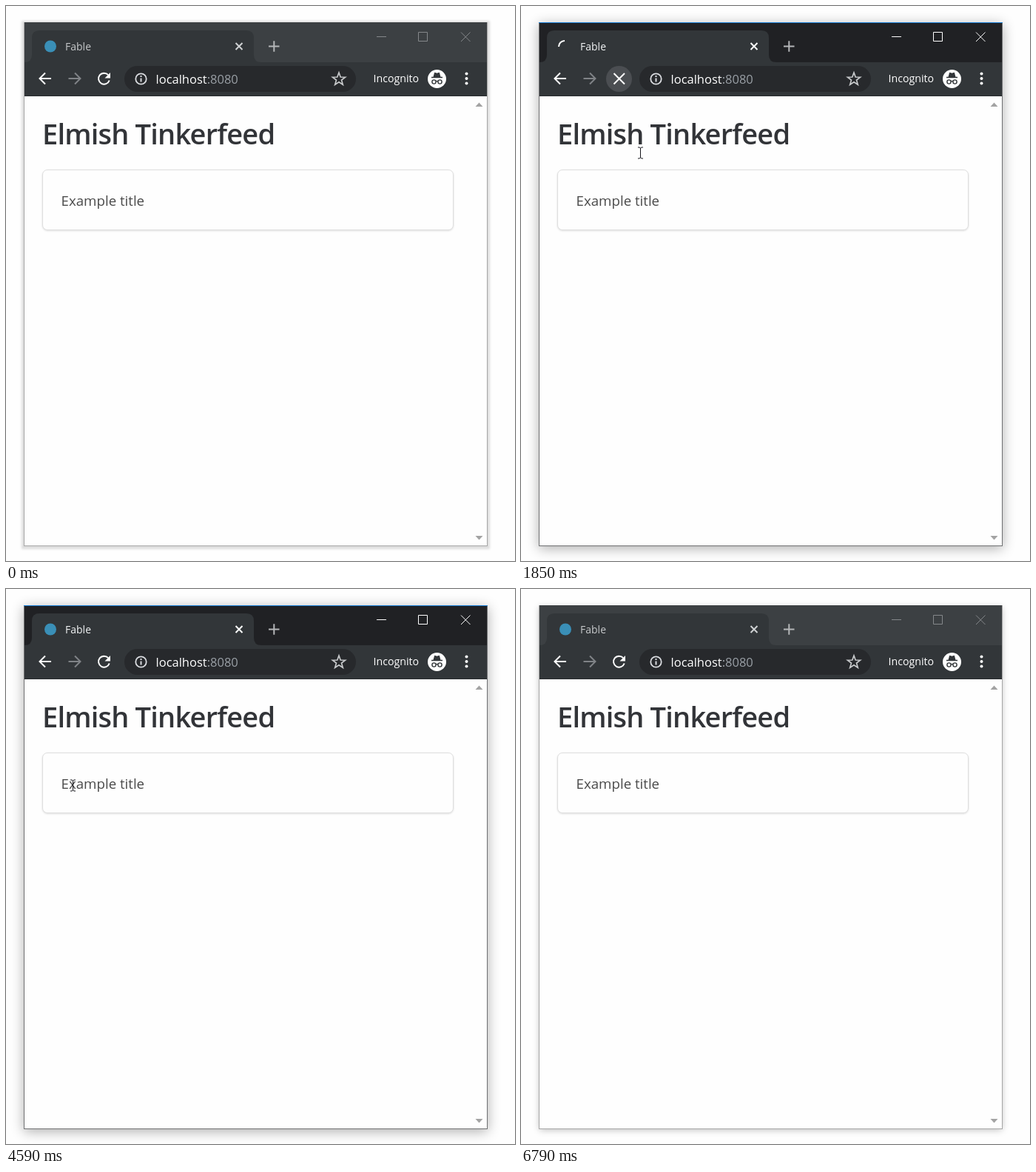
An HTML page for the animation above (6.87 s loop, 688 px wide and 750 px high).

```html
<!DOCTYPE html>
<html lang="en">
<head>
<meta charset="utf-8">
<title>Browser reload</title>
<style>
  html, body { margin: 0; width: 100%; height: 100%; overflow: hidden; background: #fefefe; }
  svg { display: block; }
  text { font-family: "Open Sans", "Noto Sans", sans-serif; }
  .line { fill: none; stroke: #fff; stroke-width: 2; }
  #frame { position: absolute; left: 25px; top: 23px; width: 625px; height: 706px; }
  #stage { position: absolute; left: 0; top: 0; }
  .entry { font-size: 18.7px; }
</style>
</head>
<body>
<div id="frame"></div>
<svg id="stage" width="688" height="750" viewBox="0 0 688 750">
  <defs>
    <clipPath id="selClip"><rect id="selArea" y="247" height="30"/></clipPath>
  </defs>

  <!-- window -->
  <rect id="border" x="24.5" y="22.5" width="626" height="707" fill="#fefefe"/>
  <rect id="bar" x="25" y="22" width="625" height="55"/>
  <rect id="topLine" x="24" y="22" width="627" height="1" fill="#1a7fd8"/>
  <path d="M25 76Q35 76 35 66V43Q35 33 45 33H325Q335 33 335 43V66Q335 76 345 76H650V122H25Z" fill="#323639"/>
  <path d="M25 121.5H650" stroke="#282b2e"/>

  <!-- tab -->
  <circle id="favicon" cx="60" cy="54.5" r="8" fill="#3a8fb7"/>
  <path id="spinner" class="line" d="M51 55A8 8 0 0 1 59 47" stroke-width="2.4"/>
  <text id="tabName" x="80" y="60" font-size="14">Fable</text>
  <path id="tabClose" class="line" d="M310.5 50L319.500 59M319.500 50L310.500 59"/>
  <path class="line" d="M355 54.500H369.500M362.300 47.200V61.700" style="stroke:#b4b6b8"/>

  <!-- window buttons -->
  <path id="controls" fill="none" d="M501 41.500H514M557.500 35.500H569.500V47.500H557.500ZM615 35.500L627.500 48M627.500 35.500L615 48"/>

  <!-- toolbar -->
  <path class="line" d="M61 98H46M53 90.500L45.500 98L53 105.500"/>
  <path class="line" d="M84.500 98H99.500M93 90.500L100.500 98L93 105.500" style="stroke:#808387"/>
  <circle id="hover" cx="132.500" cy="98.500" r="17.500" fill="#4b4e52"/>
  <g id="reload">
    <path class="line" d="M138.200 93.200A7.500 7.500 0 1 0 139.700 100.500"/>
    <path d="M141 90V97.500H133.500Z" fill="#fff"/>
  </g>
  <path id="stop" class="line" d="M125.500 91L140 105.500M140 91L125.500 105.500"/>
  <rect x="160" y="81" width="313" height="35" rx="17.500" fill="#27292c"/>
  <circle class="line" cx="182.500" cy="98.500" r="7.200" style="stroke:#dadce0;stroke-width:1.8"/>
  <path d="M182.500 97.500V102.500M182.500 94V96" stroke="#dadce0" stroke-width="2"/>
  <text x="202.500" y="104.500" font-size="16.500" fill="#fff">localhost<tspan fill="#9aa0a6">:8080</tspan></text>
  <path id="star" fill="none" stroke="#c8cacc" stroke-width="1.700"/>
  <text x="496.500" y="103" font-size="14.200" fill="#fff">Incognito</text>
  <circle cx="582.500" cy="98.500" r="12.500" fill="#fff"/>
  <path d="M575 96.500H590M578.500 95L579.700 90.700L582.500 91.500L585.300 90.700L586.500 95Z" stroke="#323639" stroke-width="1.500" fill="#323639"/>
  <path d="M581 102Q582.500 101 584 102" fill="none" stroke="#323639" stroke-width="1.300"/>
  <g fill="none" stroke="#323639" stroke-width="1.400">
    <circle cx="578.500" cy="102.500" r="2.600"/><circle cx="586.500" cy="102.500" r="2.600"/>
  </g>
  <g fill="#fff">
    <circle cx="622.500" cy="91.500" r="2"/><circle cx="622.500" cy="98" r="2"/><circle cx="622.500" cy="104.500" r="2"/>
  </g>

  <!-- page -->
  <path d="M634.500 136H644.500L639.500 130.500ZM634.500 716H644.500L639.500 721.500Z" fill="#a3a3a3"/>
  <text x="49" y="186.500" font-size="38" font-weight="600" letter-spacing="-.8" fill="#323438">Elmish Tinkerfeed</text>
  <g id="card">
    <rect x="49.500" y="221.500" width="555" height="81" rx="6.500" fill="#fefefe" stroke="#dedede"
      style="filter:drop-shadow(0 1.500px 1px rgba(10,10,10,.13))"/>
    <text id="entry" class="entry" x="74.500" y="270" fill="#4a4a4a">Example title</text>
    <g id="selection" clip-path="url(#selClip)">
      <rect x="75" y="247" width="120" height="30" fill="#3297fd"/>
      <text class="entry" x="74.500" y="270" fill="#fff">Example title</text>
    </g>
  </g>
  <path id="gear" fill="#4a4a4a" fill-rule="evenodd"/>
  <g id="status">
    <path d="M25 703H228Q232 703 232 707V729H25Z" fill="#323639"/>
    <text x="31" y="721" font-size="13.500" fill="#dadce0">Waiting for localhost...</text>
  </g>

  <!-- pointers -->
  <path id="arrow" d="M.5 .5V16.500L4.200 13L6.800 18.700L9.300 17.600L6.800 12H11.700Z" fill="#fff" stroke="#16161c"/>
  <path id="beam" fill="none" stroke="#16161c" d="M-3.500 -7.500H-1.500L0 -6.500L1.500 -7.500H3.500M0 -6.500V6.500M-3.500 7.500H-1.500L0 6.500L1.500 7.500H3.500"/>
</svg>
<script>
const LOOP = 6870;
const $ = id => document.getElementById(id);
const show = (id, on) => $(id).style.display = on ? '' : 'none';
const set = (id, name, value) => $(id).setAttribute(name, value);
const polar = (r, deg) => {
  const a = deg * Math.PI / 180;
  return `${(r * Math.cos(a)).toFixed(2)} ${(r * Math.sin(a)).toFixed(2)}`;
};

// pointer path: time, x, y
const track = [
  [70, 583, 726], [250, 510, 600], [500, 320, 375], [750, 204, 232], [980, 162, 156],
  [1200, 142, 116], [1370, 134, 99], [1500, 134, 99], [1660, 144, 130], [1850, 161, 198],
  [2080, 186, 335], [2320, 197, 424], [3880, 197, 424], [4080, 208, 385], [4330, 165, 305],
  [4560, 97, 266], [4640, 85, 268], [4780, 85, 268], [4990, 155, 263], [5190, 225, 253],
  [5630, 225, 253], [5850, 320, 375], [6100, 480, 590], [6320, 584, 706], [6590, 627, 748]
];

function slope(i, k) {
  const a = track[i - 1], b = track[i], c = track[i + 1];
  if (!a || !c || a[k] === b[k] || b[k] === c[k]) return 0;
  return (c[k] - a[k]) / (c[0] - a[0]);
}

function pointerAt(t) {
  let i = track.findIndex(p => p[0] > t) - 1;
  if (i < 0) i = t < track[0][0] ? 0 : track.length - 2;
  const a = track[i], b = track[i + 1], d = b[0] - a[0];
  const u = Math.min(1, Math.max(0, (t - a[0]) / d));
  return [1, 2].map(k =>
    (1 + 2 * u) * (1 - u) ** 2 * a[k] + u * (1 - u) ** 2 * d * slope(i, k) +
    u * u * (3 - 2 * u) * b[k] - u * u * (1 - u) * d * slope(i + 1, k));
}

function buildShapes() {
  const gear = [];
  for (let i = 0; i < 6; i++) {
    const a = i * 60;
    gear.push(polar(14.5, a - 20), polar(19.3, a - 14), polar(20, a),
      polar(19.3, a + 14), polar(14.5, a + 20), polar(14.5, a + 30));
  }
  set('gear', 'd', `M${gear.join('L')}ZM-6.5 0A6.5 6.5 0 1 0 6.500 0A6.500 6.500 0 1 0 -6.500 0Z`);
  const star = Array.from({ length: 10 }, (_, i) => polar(i % 2 ? 3.700 : 9, i * 36 - 90));
  set('star', 'd', `M${star.join('L')}Z`);
  set('star', 'transform', 'translate(450 99)');
}

function select(t, x) {
  const on = t >= 4790 && t < 5390;
  show('selection', on);
  if (!on) return;
  const entry = $('entry');
  const start = entry.getStartPositionOfChar(1).x;
  let end = start;
  for (let i = 1; i < entry.getNumberOfChars(); i++) {
    const left = entry.getStartPositionOfChar(i).x, right = entry.getEndPositionOfChar(i).x;
    if (x > (left + right) / 2) end = right;
  }
  set('selArea', 'x', start);
  set('selArea', 'width', end - start);
}

function draw(t) {
  const active = t >= 1370 && t < 6770;
  const loading = t >= 1480 && t < 2250;
  const waiting = t >= 2080 && t < 3580;

  $('frame').style.boxShadow = active
    ? '0 3px 16px 1px rgba(0,0,0,.32)'
    : t < 1370 ? '0 1px 3px 4px rgba(0,0,0,.13)' : '0 2px 9px rgba(0,0,0,.26)';
  set('border', 'stroke', active ? '#6f7072' : '#a6a6a6');
  set('bar', 'fill', active ? '#202124' : '#3c4043');
  show('topLine', active);
  set('tabName', 'fill', active ? '#f1f3f4' : '#c6c8ca');
  $('tabClose').style.stroke = active ? '#fff' : '#d0d2d4';
  set('controls', 'stroke', active ? '#fff' : '#85888b');

  show('hover', t >= 1300 && t < 2250);
  show('reload', !loading);
  show('stop', loading);
  show('favicon', !loading);
  show('spinner', loading);
  set('spinner', 'transform', `rotate(${(t - 1850) * 360 / 1568} 59 55)`);
  show('status', t >= 2000 && t < 2300);

  show('card', !waiting);
  show('gear', waiting);
  set('gear', 'transform', `translate(327 242) rotate(${(t - 2530) * .18 - 8})`);

  const [x, y] = pointerAt(t);
  const visible = t >= 70 && t < 6590;
  const overTitle = t > 1480 && t < 2080 && y > 150 && y < 208;
  const overEntry = t > 3580 && t < 5190 && x > 72 && x < 190 && y > 250 && y < 280;
  const beam = overTitle || overEntry || (t >= 4790 && t < 5180);
  show('arrow', visible && !beam);
  show('beam', visible && beam);
  set('arrow', 'transform', `translate(${Math.round(x) - .5} ${Math.round(y) - .5})`);
  set('beam', 'transform', `translate(${Math.round(x) + .5} ${Math.round(y) + .5})`);
  select(t, x);
}

buildShapes();
const begin = performance.now();
function tick() {
  draw((performance.now() - begin) % LOOP);
  requestAnimationFrame(tick);
}
tick();
</script>
</body>
</html>
```
